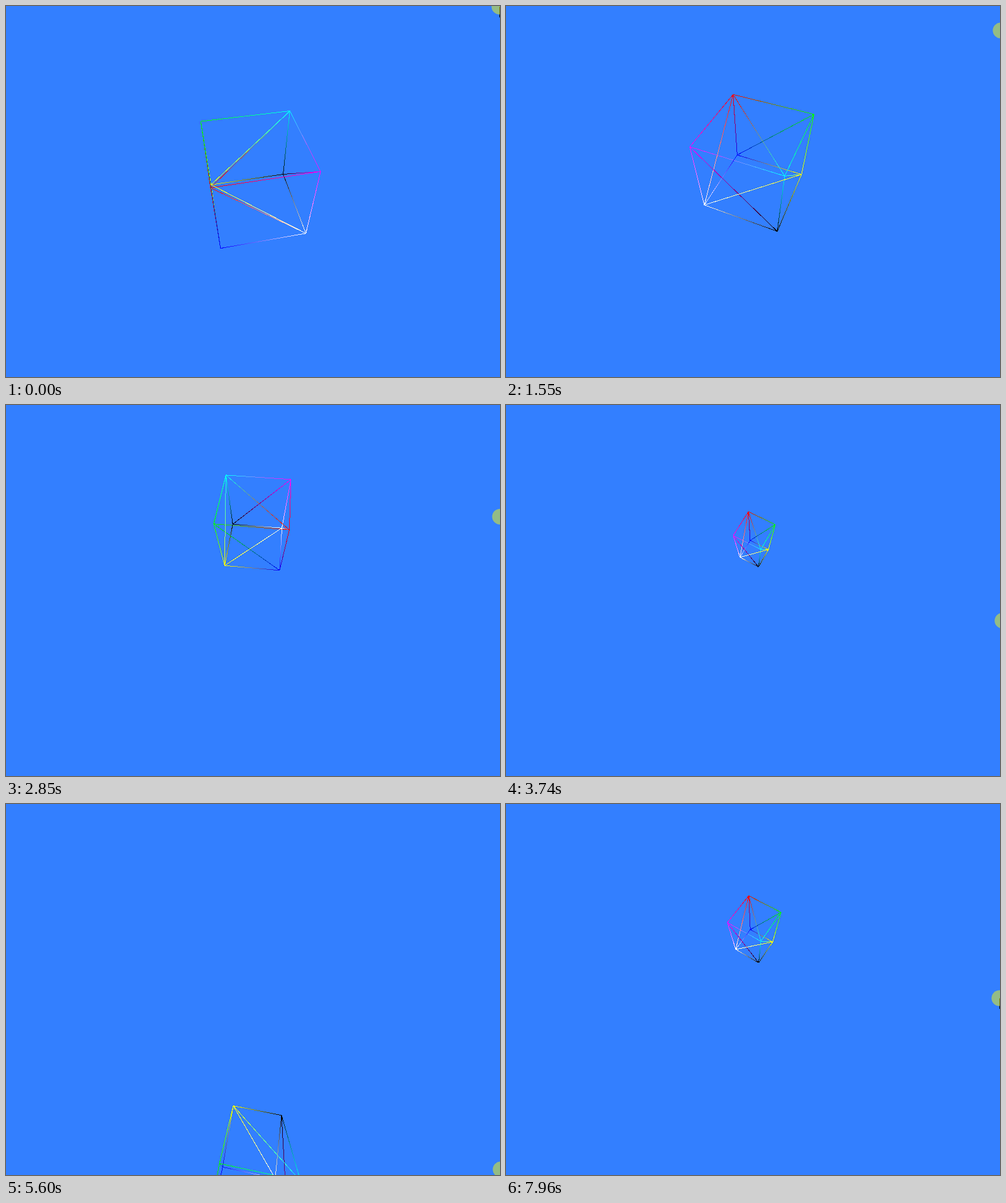
Write an HTML page that moves like this. It is 787 px wide and 592 px high and loops after 7990 ms.

```html
<!DOCTYPE html>
<html lang="en">
<head>
<meta charset="utf-8">
<title>Wireframe cube</title>
<style>
  html, body { margin: 0; width: 100%; height: 100%; overflow: hidden; background: #337fff; }
  svg { display: block; width: 787px; height: 592px; }
</style>
</head>
<body>
<svg id="stage" viewBox="0 0 787 592">
  <defs id="defs"></defs>
  <g id="edges" shape-rendering="crispEdges" stroke-width="1"></g>
  <g id="pointer">
    <path d="M.5 .5V17L4.5 13L7 19L9.5 18L7 12H12Z" fill="#fff" stroke="#000"/>
    <circle r="12.5" fill="#ff0" fill-opacity=".48"/>
  </g>
</svg>
<script>
const LOOP = 7990;
const CENTER = [394.5, 304];
const CUBE_X = 0.015, DIST = 3.3, ELEVATION = 45.6;

// Corner: position along the three cube axes, and colour
const CORNERS = {
  R: [-1, -1, -1, 255, 0, 0],
  G: [1, -1, -1, 0, 255, 0],
  M: [-1, 1, -1, 255, 0, 255],
  B: [-1, -1, 1, 0, 0, 255],
  C: [1, 1, -1, 0, 255, 255],
  W: [-1, 1, 1, 255, 255, 255],
  Y: [1, -1, 1, 255, 255, 0],
  K: [1, 1, 1, 0, 0, 0]
};
// Twelve edges, then one diagonal per face
const EDGES = "RG MC BY WK RM GC BW YK RB GY MW CK RC RW MK GB YC YW".split(" ");

// Time (ms) to turn of the cube (degrees)
const TURN = [[0, 258.6], [790, 118], [890, 114], [1550, 23.1], [1660, 8], [1760, 3],
  [2530, -118.5], [2850, -174], [3340, -262], [3740, -331.1], [4140, -394.5],
  [4940, -504.5], [5600, -620.3], [5760, -650], [6580, -799], [6730, -828.1],
  [7390, -945], [7960, -1047.5], [7990, -1052]];
// Time to pointer position
const POINTER_Y = [[0, 1], [890, 14], [1550, 39], [1760, 51], [2560, 145], [2850, 178],
  [3740, 344], [4155, 402], [4955, 506], [5600, 583], [5850, 595], [6150, 592],
  [6580, 557], [6730, 533], [7400, 422], [7960, 310], [7990, 304]];
const POINTER_X = [[0, 786], [1550, 788], [2850, 787], [3740, 791], [5600, 788], [6730, 785], [7990, 786]];
// Pointer height to camera tilt (degrees) and focal length (px)
const TILT = [[0, 3.3], [39, 7.1], [178, 20.6], [310, 35.5], [344, 39], [533, 53.3], [600, 57.5]];
const FOCAL = [[0, 468], [39, 433.6], [178, 294.7], [310, 135.7], [344, 102.3],
  [533, -116.6], [583, -188], [600, -212]];

function sample(knots, x) {
  let i = 1;
  while (i < knots.length - 1 && x > knots[i][0]) i++;
  const [x0, y0] = knots[i - 1], [x1, y1] = knots[i];
  return y0 + (y1 - y0) * (x - x0) / (x1 - x0);
}

function add(parent, tag, attrs) {
  const node = document.createElementNS("http://www.w3.org/2000/svg", tag);
  set(node, attrs);
  return parent.appendChild(node);
}

function set(node, attrs) {
  for (const key in attrs) node.setAttribute(key, attrs[key]);
}

const byId = id => document.getElementById(id);
const rgb = c => `rgb(${c.map(Math.round)})`;

const lines = EDGES.map(([from, to]) => {
  const id = "edge" + from + to;
  const c0 = CORNERS[from].slice(3), c1 = CORNERS[to].slice(3);
  const gradient = add(byId("defs"), "linearGradient", { id, gradientUnits: "userSpaceOnUse" });
  add(gradient, "stop", { offset: 0, "stop-color": rgb(c0) });
  const middle = add(gradient, "stop", { "stop-color": rgb(c0.map((v, i) => (v + c1[i]) / 2)) });
  add(gradient, "stop", { offset: 1, "stop-color": rgb(c1) });
  const line = add(byId("edges"), "line", { stroke: `url(#${id})` });
  return { from, to, gradient, middle, line };
});

function project(turn, tilt, focal) {
  const rad = Math.PI / 180;
  const pitch = (ELEVATION + tilt) * rad;
  const st = Math.sin(turn * rad), ct = Math.cos(turn * rad);
  const sp = Math.sin(pitch), cp = Math.cos(pitch);
  const points = {};
  for (const name in CORNERS) {
    const [a, b, c] = CORNERS[name].map(v => v / 2);
    const side = a * ct - b * st, depth = a * st + b * ct;
    const x = CUBE_X + side;
    const y = -DIST * Math.sin(tilt * rad) + depth * sp + c * cp;
    const z = DIST * Math.cos(tilt * rad) - depth * cp + c * sp;
    points[name] = { x: CENTER[0] + focal * x / z + 0.5, y: CENTER[1] + focal * y / z + 0.5, z };
  }
  return points;
}

function draw(time) {
  const y = sample(POINTER_Y, time);
  const points = project(sample(TURN, time), sample(TILT, y), sample(FOCAL, y));
  for (const { from, to, gradient, middle, line } of lines) {
    const p = points[from], q = points[to];
    const ends = { x1: p.x, y1: p.y, x2: q.x, y2: q.y };
    set(line, ends);
    set(gradient, ends);
    set(middle, { offset: q.z / (p.z + q.z) });
  }
  const x = sample(POINTER_X, time);
  set(byId("pointer"), { transform: `translate(${x} ${y})` });
}

const start = performance.now();
function tick() {
  draw((performance.now() - start) % LOOP);
  requestAnimationFrame(tick);
}
tick();
</script>
</body>
</html>
```
